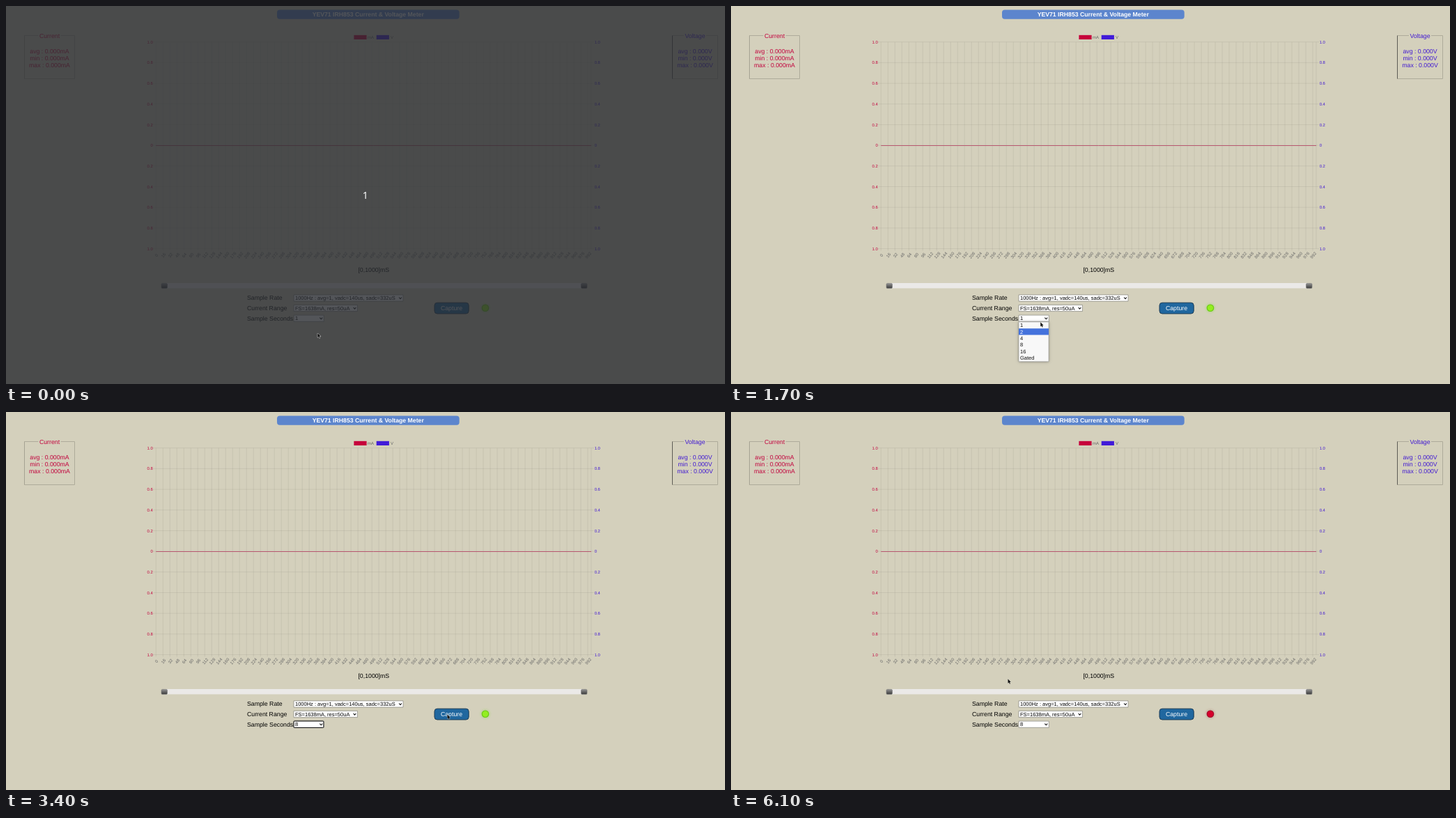
An HTML page with a canvas for the animation above (8 s loop, 1032 px wide and 543 px high).

```html
<!DOCTYPE html>
<html lang="en">
<head>
<meta charset="utf-8">
<title>Current &amp; Voltage Meter</title>
<style>
html, body { margin: 0; width: 100%; height: 100%; overflow: hidden; background: #d4d0bc; }
canvas { display: block; }
</style>
</head>
<body>
<canvas id="stage" width="1032" height="543"></canvas>
<script>
const ctx = document.getElementById('stage').getContext('2d');
ctx.textRendering = 'geometricPrecision';

const LOOP = 8000, STEP = 100;
const PAPER = '#d4d0bc', RED = '#c2003c', BLUE = '#4119d2';
const PLOT = { left: 215.3, right: 840, top: 51.7, bottom: 348.6 };
const LIST = { x: 413, top: 453.8, width: 43, row: 9.4, options: ['1', '2', '4', '8', '16', 'Gated'] };

// Pointer moves, each ending at (x, y)
const START = { x: 447.3, y: 470 };
const MOVES = [
  { from: 700, to: 800, x: 435.7, y: 465.5 },
  { from: 1000, to: 1200, x: 445, y: 448.3 },
  { from: 1700, to: 2200, x: 440.4, y: 484 },
  { from: 2800, to: 3000, x: 602.5, y: 447.5 },
  { from: 3200, to: 3400, x: 633.5, y: 434.5 },
  { from: 4200, to: 4200, x: 615.5, y: 434.3 },
  { from: 4300, to: 4700, x: 336.5, y: 374 },
  { from: 5300, to: 5500, x: 436.5, y: 384, ease: 1.3 },
  { from: 5800, to: 6100, x: 397.5, y: 383.5, ease: 0.6 }
];

function pointerAt(t) {
  let { x, y } = START;
  for (const move of MOVES) {
    if (t < move.from) break;
    const steps = (move.to - move.from) / STEP + 1;
    const done = Math.min(Math.floor((t - move.from) / STEP) + 1, steps);
    const k = (done / steps) ** (move.ease ?? 1);
    x += (move.x - x) * k;
    y += (move.y - y) * k;
  }
  return { x, y };
}

function text(str, x, cy, color = '#000', { size = 8.75, align = 'left', weight = '', family = 'Liberation Sans' } = {}) {
  ctx.font = `${weight} ${size}px "${family}", Arial, sans-serif`;
  ctx.textAlign = align;
  ctx.fillStyle = color;
  ctx.fillText(str, x, cy + size * 0.35);
}

function box(x, y, w, h, { fill, stroke, radius = 0, line = 1 }) {
  ctx.beginPath();
  ctx.roundRect(x, y, w, h, radius);
  if (fill) { ctx.fillStyle = fill; ctx.fill(); }
  if (stroke) { ctx.strokeStyle = stroke; ctx.lineWidth = line; ctx.stroke(); }
}

function disc(x, y, r, color) {
  ctx.beginPath();
  ctx.arc(x, y, r, 0, 2 * Math.PI);
  ctx.fillStyle = color;
  ctx.fill();
}

function path(points, color, width = 1) {
  ctx.beginPath();
  points.forEach(([x, y]) => ctx.lineTo(x, y));
  ctx.strokeStyle = color;
  ctx.lineWidth = width;
  ctx.stroke();
}

function withShadow(color, blur, paint) {
  ctx.save();
  ctx.shadowColor = color;
  ctx.shadowBlur = blur;
  paint();
  ctx.restore();
}

function readout(title, unit, x, width, color, edge) {
  const mid = x + width / 2, half = title.length * 2.15 + 1;
  box(x, 42.5, width, 62, { stroke: '#aaa797', line: 0.9 });
  path([[x, 42.5], [x, 104.5]], edge);
  ctx.fillStyle = PAPER;
  ctx.fillRect(mid - half, 40, half * 2, 5);
  text(title, mid, 43, color, { align: 'center' });
  ['avg', 'min', 'max'].forEach((name, i) =>
    text(`${name} : 0.000${unit}`, mid, 65 + i * 10, color, { align: 'center' }));
}

function chart() {
  const { left, right, top, bottom } = PLOT;
  const grid = 'rgba(0,0,0,.12)', thin = 0.55;
  box(499.4, 41.8, 18.2, 6.2, { fill: '#c6003b' });
  box(531.7, 41.8, 18.2, 6.2, { fill: '#411bd8' });
  text('mA', 519, 44.8, '#666', { size: 6 });
  text('V', 552, 44.8, '#666', { size: 6 });

  const pitch = (right - left) / 62.5;
  for (let i = 0; i <= 62; i++) {
    const x = left + i * pitch;
    path([[x, top], [x, bottom + 3]], grid, thin);
    ctx.save();
    ctx.translate(x + 0.7, 358);
    ctx.rotate(-0.87);
    text(String(i * 16), 0, 0, '#666', { size: 6, align: 'center' });
    ctx.restore();
  }
  path([[right, top], [right, bottom]], grid, thin);

  for (let i = 0; i <= 10; i++) {
    const y = top + (bottom - top) * i / 10;
    const label = i === 5 ? '0' : (Math.abs(5 - i) / 5).toFixed(1);
    path([[left - 4, y], [right + 4, y]], grid, thin);
    text(label, 210.7, y, RED, { size: 5.9, align: 'right' });
    text(label, 844.7, y, BLUE, { size: 5.9 });
  }
  path([[left, 200.5], [right, 200.5]], '#b85870');
}

function select(y, width, value, focused) {
  box(LIST.x, y - 4.6, width, 9.2, { fill: '#fff', stroke: '#85847f', line: 0.7 });
  if (focused) box(LIST.x, y - 4.8, width - 0.4, 9.6, { stroke: '#101010', radius: 1.2 });
  text(value, 415, y + 0.1, '#000', { size: 7.5 });
  const x = LIST.x + width - 4;
  path([[x - 1.9, y - 1], [x, y + 1.1], [x + 1.9, y - 1]], '#111', 1.1);
}

function slider() {
  box(227, 398, 602, 7.6, { fill: '#ebe9e7' });
  const metal = ctx.createLinearGradient(0, 398, 0, 406);
  metal.addColorStop(0, '#999');
  metal.addColorStop(1, '#333');
  for (const x of [223, 825.5])
    box(x, 398.4, 8.5, 7.2, { fill: metal, stroke: '#777', radius: 1.5, line: 0.6 });
}

function button(pressed) {
  box(615, 426.2, 49.2, 15.8, { fill: pressed ? '#1a5a8c' : '#20679f', stroke: '#1c3c56', radius: 4 });
  text('Capture', 639.5, 434, '#fff', { align: 'center' });
}

function led(busy) {
  const [core, edge, glow] = busy
    ? ['#d6002c', '#a0062a', 'rgba(150,60,60,.5)']
    : ['#93ee20', '#68c814', 'rgba(120,220,40,.6)'];
  withShadow(glow, 4, () => disc(688, 433.8, 5.3, edge));
  disc(688, 433.8, 4.2, core);
}

function dropdown(active) {
  const { x, top, width, row, options } = LIST;
  const height = row * options.length + 0.6;
  withShadow('rgba(0,0,0,.4)', 4, () => box(x, top, width, height, { fill: '#f8f8f8' }));
  box(x, top, width, height, { stroke: '#9a9a98', line: 0.6 });
  options.forEach((name, i) => {
    if (i === active) box(x, top + i * row, width, row, { fill: '#4472dc' });
    text(name, 415, top + (i + 0.5) * row, i === active ? '#fff' : '#111', { size: 7.5 });
  });
}

function pointer({ x, y }, outline) {
  ctx.save();
  ctx.translate(x, y);
  ctx.scale(0.88, 0.88);
  ctx.beginPath();
  [[0, 0], [0, 7], [1.6, 5.6], [2.8, 8.2], [3.9, 7.7], [2.8, 5.2], [4.9, 5]].forEach(p => ctx.lineTo(...p));
  ctx.closePath();
  ctx.strokeStyle = outline;
  ctx.lineWidth = 1.1;
  ctx.stroke();
  ctx.fillStyle = '#111';
  ctx.fill();
  ctx.restore();
}

function draw(t) {
  const cursor = pointerAt(t);
  const within = (from, to) => t >= from && t < to;
  const countdown = t < 100;

  ctx.fillStyle = PAPER;
  ctx.fillRect(0, 0, 1032, 543);
  box(389, 5.5, 261.7, 13.2, { fill: '#5c85cd', radius: 4 });
  text('YEV71 IRH853 Current & Voltage Meter', 519.7, 12, '#fff', { size: 8.7, align: 'center', weight: 'bold' });
  readout('Current', 'mA', 26.5, 72, RED, '#a5a293');
  readout('Voltage', 'V', 956.5, 65, BLUE, '#5c5b55');
  chart();
  text('[0,1000]mS', 527.8, 379, '#000', { align: 'center' });
  slider();

  text('Sample Rate', 346, 419.2);
  text('Current Range', 346, 434);
  text('Sample Seconds', 346, 448.5);
  select(419.5, 157, '1000Hz : avg=1, vadc=140us, sadc=332uS');
  select(434, 91.5, 'FS=1638mA, res=50uA');
  select(448.7, 43.3, t < 2500 ? '1' : '8', within(1200, 1400) || within(2500, 3600));
  button(within(3600, 3800));
  led(t >= 3800);
  if (within(1400, 2500)) {
    const hovered = Math.floor((cursor.y - LIST.top) / LIST.row);
    dropdown(Math.max(hovered, t < 1700 ? 0 : 1));
  }

  if (countdown) {
    ctx.fillStyle = 'rgba(40,43,48,.8)';
    ctx.fillRect(0, 0, 1032, 543);
    text('1', 515.8, 271.8, '#fff', { size: 14, align: 'center', family: 'Noto Sans' });
  }
  pointer(cursor, countdown ? '#eee' : 'rgba(235,232,220,.6)');
}

function tick() {
  draw(performance.now() % LOOP);
  requestAnimationFrame(tick);
}
tick();
</script>
</body>
</html>
```
